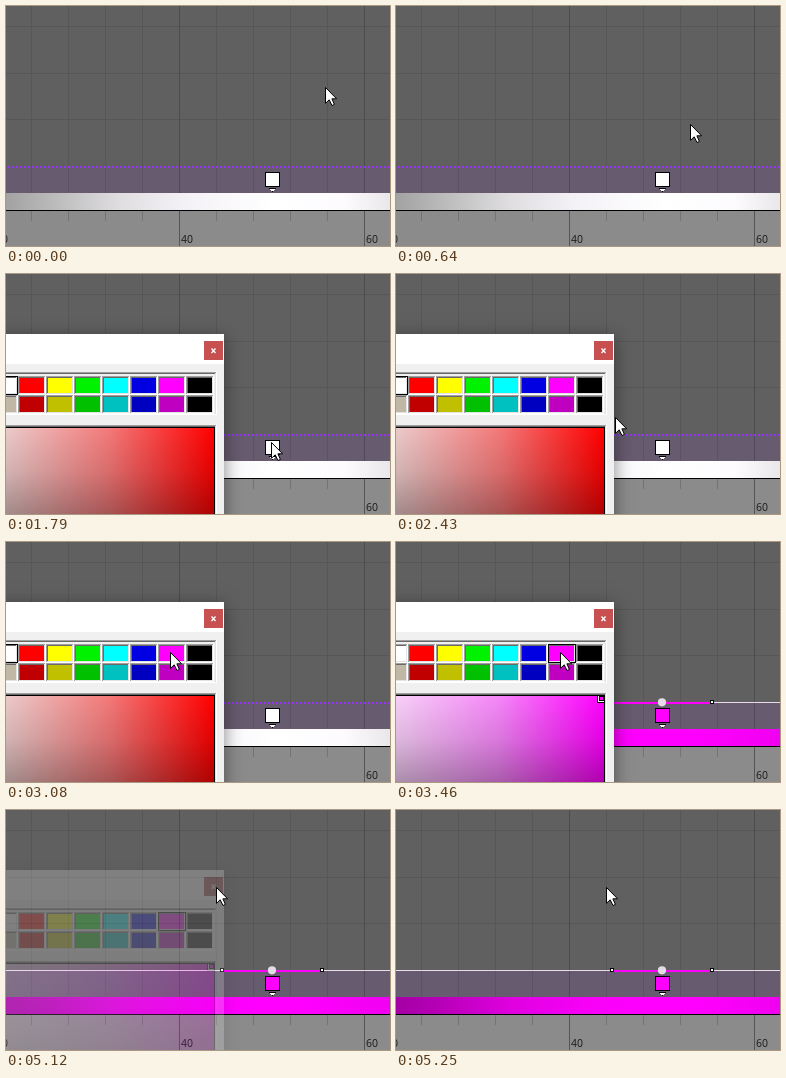
These frames come from a looping animation (384x240 px, 6380 ms). An HTML page with a canvas:

```html
<!DOCTYPE html>
<html lang="en">
<head>
<meta charset="utf-8">
<title>Gradient key colour</title>
<style>
html, body { margin: 0; height: 100%; overflow: hidden; background: #606060; }
canvas { display: block; }
</style>
</head>
<body>
<canvas id="stage" width="384" height="240"></canvas>
<script>
const page = document.getElementById('stage').getContext('2d');
const panel = page.canvas.cloneNode().getContext('2d');
let c = page;

const LOOP = 6380, STEP = 130;
const OPEN = 1790, PICK = 3460, HOVER = 4600, PRESS = 4860, FADE = 4990, CLOSED = 5250;
const MAGENTA = '#ff00ff';
const BRIGHT = ['#fff', '#f00', '#ff0', '#00f200', '#0ff', '#0000e2', MAGENTA, '#000'];
const DARK = ['#c0b8a4', '#c00000', '#c0c000', '#00c000', '#00c0c0', '#0000c0', '#c000c0', '#000'];

// start time, steps, target x, target y
const moves = [
  [250, 5, 288, 127], [900, 4, 265, 168],
  [2170, 5, 189, 127], [2820, 3, 164, 110],
  [4210, 4, 210, 85], [4730, 1, 210, 77]
];

function rect(x, y, w, h, color) {
  c.fillStyle = color;
  c.fillRect(x, y, w, h);
}

function box(x, y, w, h, fill, edge = '#000') {
  rect(x, y, w, h, edge);
  rect(x + 1, y + 1, w - 2, h - 2, fill);
}

// two-pixel sunken bevel around a fill
function sunken(x, y, w, h, fill) {
  rect(x, y, w, h, '#fff');
  rect(x, y, w - 1, h - 1, '#a0a0a0');
  rect(x + 1, y + 1, w - 2, h - 2, '#e3e3e3');
  rect(x + 1, y + 1, w - 3, h - 3, '#696969');
  rect(x + 2, y + 2, w - 4, h - 4, fill);
}

function blend(x0, y0, x1, y1, stops) {
  const g = c.createLinearGradient(x0, y0, x1, y1);
  stops.forEach(([at, color]) => g.addColorStop(at, color));
  return g;
}

function cursorAt(t) {
  let x = 319, y = 81;
  for (const [start, n, tx, ty] of moves) {
    const k = Math.max(0, Math.min(n, Math.floor((t - start) / STEP) + 1)) / n;
    x += (tx - x) * k;
    y += (ty - y) * k;
  }
  return [Math.round(x), Math.round(y)];
}

function drawGraph(picked) {
  rect(0, 0, 384, 240, '#606060');
  rect(0, 161, 384, 26, '#665b6f');
  rect(0, 205, 384, 35, '#8b8b8b');
  for (const y of [20, 67, 113]) rect(0, y, 384, 1, '#575757');
  for (let i = 0; i < 10; i++) {
    const x = 25 + 37 * i, major = i % 5 === 4;
    rect(x, 0, 1, 187, major ? 'rgba(0,0,0,.2)' : 'rgba(0,0,0,.09)');
    rect(x, 205, 1, major ? 35 : 10, major ? '#555' : '#747474');
  }
  c.font = '10.5px "Noto Sans", "Open Sans", sans-serif';
  c.fillStyle = '#202020';
  [20, 40, 60].forEach((n, i) => c.fillText(n, -10 + 185 * i, 237));

  const ramp = picked
    ? [[0, '#a400a4'], [.12, '#b800b8'], [.3, '#e000e0'], [.5, '#f800f8'], [.65, MAGENTA], [.78, MAGENTA], [1, '#f000f0']]
    : [[0, '#a2a2a2'], [.12, '#bababa'], [.3, '#e0dee1'], [.46, '#f4f1f6'], [.7, '#fff'], [.88, '#fdfbfe'], [1, '#e9e7ea']];
  rect(0, 187, 384, 17, blend(0, 0, 384, 0, ramp));
  rect(0, 204, 384, 1, '#000');

  if (picked) {
    rect(0, 160, 384, 1, '#eadcec');
    rect(216, 160, 100, 2, MAGENTA);
    for (const x of [214, 314]) box(x, 158, 4, 4, '#fff');
    c.fillStyle = '#e6dce8';
    c.beginPath();
    c.arc(266, 160.3, 4.1, 0, 7);
    c.fill();
  } else {
    for (let x = 2; x < 384; x += 4) rect(x, 160, 2, 2, '#9632fa');
  }

  box(259, 166, 15, 15, picked ? MAGENTA : '#fff');
  for (let i = 0; i < 4; i++) {
    rect(263 + i, 182 + i, 7 - 2 * i, 1, '#000');
    if (i && i < 3) rect(263 + i, 182 + i, 7 - 2 * i, 1, '#fff');
  }
}

function drawSwatch(x, y, color, chosen) {
  sunken(x, y, 28, 19, color);
  if (chosen) {
    c.strokeStyle = '#000';
    c.lineWidth = 1;
    c.strokeRect(x + .5, y + .5, 27, 18);
  }
}

function drawDialog(t) {
  const picked = t >= PICK, hover = t >= HOVER;
  c.save();
  c.shadowColor = 'rgba(0,0,0,.45)';
  c.shadowBlur = 17;
  c.shadowOffsetY = 4;
  rect(-40, 60, 258, 220, '#f0f0f0');
  c.restore();
  rect(0, 60, 218, 30, '#fff');

  rect(198, 67, 19, 19, t >= PRESS ? '#993d3d' : hover ? '#dc6060' : '#c75050');
  c.strokeStyle = hover ? '#f6d4d4' : '#fff';
  c.lineWidth = 1.3;
  c.beginPath();
  c.moveTo(205.5, 74.5); c.lineTo(209.5, 79);
  c.moveTo(209.5, 74.5); c.lineTo(205.5, 79);
  c.stroke();

  sunken(-40, 98, 251, 43, '#f0f0f0');
  for (let i = 0; i < 8; i++) {
    const x = -16 + 28 * i;
    drawSwatch(x, 102, BRIGHT[i], i === (picked ? 6 : 0));
    drawSwatch(x, 121, DARK[i]);
  }

  // colour field
  sunken(-40, 151, 251, 120, '#000');
  const field = picked
    ? [[0, '#f8d0f8'], [.5, '#f585f8'], [1, MAGENTA]]
    : [[0, '#eccaca'], [.5, '#f47878'], [1, '#ff0000']];
  const shade = [[0, 'rgba(0,0,0,0)'], [.5, 'rgba(0,0,0,.11)'], [1, 'rgba(0,0,0,.31)']];
  rect(0, 154, 208, 86, blend(0, 0, 208, 0, field));
  rect(0, 154, 208, 86, blend(0, 154, 0, 240, shade));
  if (picked) {
    box(201, 153, 8, 8, '#fff');
    box(203, 154, 5, 5, MAGENTA);
  }
}

const arrow = new Path2D('M.5 .5V16.3L4.2 12.8L7 18.5L9.4 17.4L6.9 11.8H11.6Z');

function drawCursor(x, y) {
  c.save();
  c.translate(x, y);
  c.lineWidth = 1;
  c.fillStyle = '#fff';
  c.strokeStyle = '#000';
  c.fill(arrow);
  c.stroke(arrow);
  c.restore();
}

function draw(t) {
  drawGraph(t >= PICK);
  if (t >= OPEN && t < CLOSED) {
    c = panel;
    c.clearRect(0, 0, 384, 240);
    drawDialog(t);
    c = page;
    c.globalAlpha = t < FADE ? 1 : t < FADE + STEP ? .6 : .2;
    c.drawImage(panel.canvas, 0, 0);
    c.globalAlpha = 1;
  }
  drawCursor(...cursorAt(t));
}

const begin = performance.now();
function tick() {
  draw((performance.now() - begin) % LOOP);
  requestAnimationFrame(tick);
}
tick();
</script>
</body>
</html>
```
